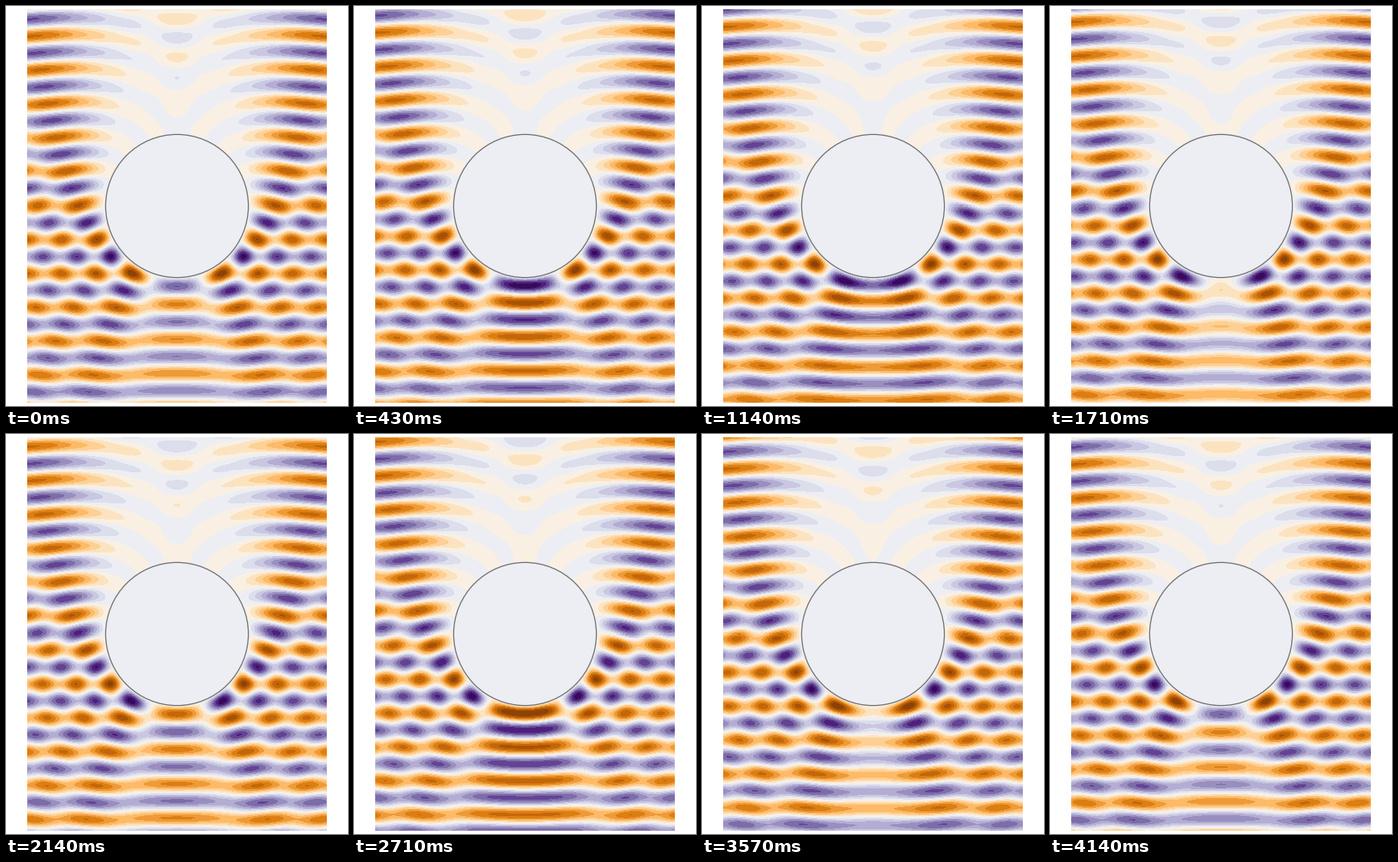
Recreate the animation shown at these times as a matplotlib script. Size 420x490 px, loop 4280 ms.

```python
"""Plane wave travelling upward and scattering off a sound-soft sphere."""
import matplotlib.pyplot as plt
import numpy as np
from matplotlib.animation import FuncAnimation
from matplotlib.patches import Circle

WIDTH, HEIGHT, DPI = 420, 490, 100
PLOT_W, PLOT_H, MARGIN_X, MARGIN_Y = 368, 482, 26, 4
RADIUS, WAVELENGTH = 87.63, 41.4
K = 2 * np.pi / WAVELENGTH
ORDERS = 32
STEP, BANDS = 0.2, 18           # contour spacing and number of filled bands
STEPS, FPS = 30, 7              # the last step closes the wave period
TICK, TICKS = 10, 428           # ms per tick, ticks per loop


def hankel_start(x):
    """Spherical Hankel functions of order 0 and 1."""
    wave = np.exp(1j * x)
    return -1j * wave / x, -wave * (x + 1j) / x**2


def scattered(r, c):
    """Partial-wave sum for a field that vanishes on the sphere."""
    x, xa = K * r, K * RADIUS
    h, h_next = hankel_start(x)
    ha, ha_next = hankel_start(xa)
    p, p_next = np.ones_like(c), c
    total = np.zeros(r.shape, complex)
    for n in range(ORDERS):
        total -= (2 * n + 1) * 1j**n * (ha.real / ha) * h * p
        m = 2 * n + 3
        h, h_next = h_next, m / x * h_next - h
        ha, ha_next = ha_next, m / xa * ha_next - ha
        p, p_next = p_next, (m * c * p_next - (n + 1) * p) / (n + 2)
    return total


def total_field():
    x = np.arange(PLOT_W) + 0.5 - PLOT_W / 2
    y = PLOT_H / 2 - np.arange(PLOT_H) - 0.5
    xx, yy = np.meshgrid(x, y)
    dist = np.hypot(xx, yy)
    field = np.exp(1j * K * yy) + scattered(np.maximum(dist, RADIUS), yy / dist)
    field[dist < RADIUS] = 0
    return field


palette = plt.get_cmap("PuOr_r")((np.arange(BANDS) + 0.5) / BANDS, bytes=True)[:, :3]


def banded(field, phase):
    wave = (field * np.exp(-1j * phase)).real
    band = np.ceil(wave / STEP).astype(int) + BANDS // 2 - 1
    return palette[np.clip(band, 0, BANDS - 1)]


field = total_field()
pictures = [banded(field, 2 * np.pi * i / (STEPS - 1)) for i in range(STEPS)]

fig = plt.figure(figsize=(WIDTH / DPI, HEIGHT / DPI), dpi=DPI, facecolor="white")
ax = fig.add_axes([MARGIN_X / WIDTH, MARGIN_Y / HEIGHT,
                   PLOT_W / WIDTH, PLOT_H / HEIGHT])
ax.axis("off")
image = ax.imshow(pictures[0], interpolation="nearest", aspect="auto",
                  extent=(-PLOT_W / 2, PLOT_W / 2, -PLOT_H / 2, PLOT_H / 2))
ax.add_patch(Circle((0, 0), RADIUS, facecolor=palette[BANDS // 2 - 1] / 255,
                    edgecolor="#707070", linewidth=1.3 * 72 / DPI))


def update(tick):
    step = int((tick + 0.5) * TICK * FPS / 1000)
    image.set_data(pictures[min(step, STEPS - 1)])
    return (image,)


anim = FuncAnimation(fig, update, frames=TICKS, interval=TICK,
                     repeat=True, repeat_delay=0)
plt.show()
```
